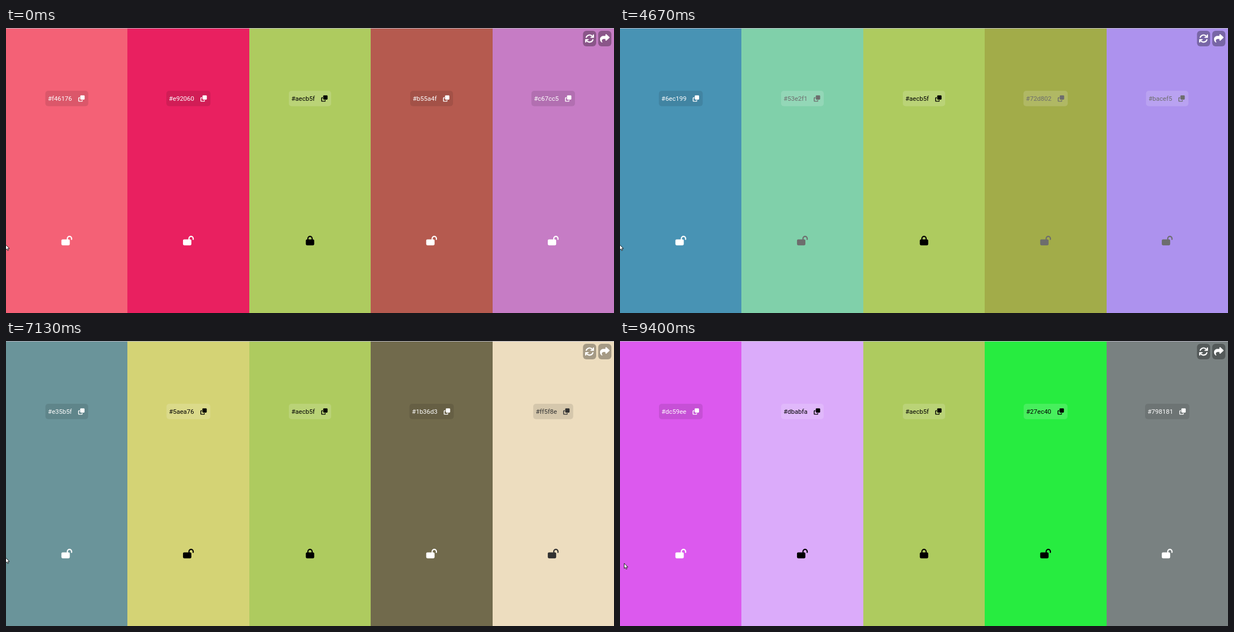
An HTML page with a canvas for the animation above (9940 ms loop, 1092 px wide and 513 px high).

```html
<!DOCTYPE html>
<html lang="en">
<head>
<meta charset="utf-8">
<title>Colour palettes</title>
<style>
  html, body { margin: 0; width: 100%; height: 100%; overflow: hidden; }
  canvas { display: block; }
</style>
</head>
<body>
<canvas id="stage" width="1092" height="513"></canvas>
<script>
const ctx = document.getElementById('stage').getContext('2d');
const LOOP = 9940, TICK = 1000 / 15, FADE = 100, COLUMN = 218.4;
const FONT = '11.5px Roboto, sans-serif';
const LOCKED = 2;

// Fade start in ms, then the five colours
const palettes = [
  [-FADE, 'f46176', 'e92060', 'aecb5f', 'b55a4f', 'c67cc5'],
  [3163, '9853bb', 'e5354c', 'aecb5f', 'c4261a', '83e3c1'],
  [3690, '1656d9', 'bcb94a', 'aecb5f', 'e272a9', '9b41e4'],
  [4633.5, '6ec199', '53e2f1', 'aecb5f', '72d802', 'bacef5'],
  [5450.5, 'a9a1a8', '5f8456', 'aecb5f', 'c1e27c', '78e121'],
  [6283, '4da2a8', 'f1cd75', 'aecb5f', '86762c', 'e9fbcb'],
  [7118, 'e35b5f', '5aea76', 'aecb5f', '1b36d3', 'ff5f8e'],
  [7933, 'dc59ee', 'dbabfa', 'aecb5f', '27ec40', '798181'],
].map(([start, ...colors]) => ({ start, colors }));

// Icons are drawn on a 512-unit grid
const copyIcon = new Path2D('M288 448H64V224h64V160H64c-35 0-64 29-64 64V448c0 35 29 64 64 64H288c35 0 64-29 64-64V384H288zM224 352H448c35 0 64-29 64-64V64c0-35-29-64-64-64H224c-35 0-64 29-64 64V288c0 35 29 64 64 64z');
const lockIcon = new Path2D('M144 144v48H304V144a80 80 0 0 0-160 0zM80 192V144a144 144 0 0 1 288 0v48h16a64 64 0 0 1 64 64V448a64 64 0 0 1-64 64H64a64 64 0 0 1-64-64V256a64 64 0 0 1 64-64z');
const openIcon = new Path2D('M352 144a80 80 0 0 1 160 0v48a32 32 0 0 0 64 0V144a144 144 0 0 0-288 0v48H64a64 64 0 0 0-64 64V448a64 64 0 0 0 64 64H384a64 64 0 0 0 64-64V256a64 64 0 0 0-64-64H352z');
const shareIcon = new Path2D('M307 35c-12 5-19 16-19 29v64H176C79 128 0 207 0 304c0 113 82 164 100 174 14 7 28-4 28-18 0-7-4-14-10-19-9-9-22-27-22-57 0-53 43-96 96-96h96v64c0 13 7 24 19 29s25 3 34-5l160-144c14-13 14-35 0-48l-160-144c-9-8-23-10-34-5z');
const turnArrow = new Path2D('M75 192A192 192 0 0 1 392 120L464 192M464 64V192H336');
const pointer = new Path2D('M.5 .5V9.3L2.6 7.5 4.1 10.8 5.6 10.1 4.2 7H6.9z');

const rgb = hex => [0, 2, 4].map(i => parseInt(hex.slice(i, i + 2), 16));
const mix = (a, b, f) => `rgb(${a.map((v, i) => Math.round(v + (b[i] - v) * f))})`;

function ink(color) {
  const [r, g, b] = color.map(v => {
    v /= 255;
    return v <= .03928 ? v / 12.92 : ((v + .055) / 1.055) ** 2.4;
  });
  return .2126 * r + .7152 * g + .0722 * b > .5 ? [0, 0, 0] : [255, 255, 255];
}

// CSS "ease": cubic-bezier(.25, .1, .25, 1)
function ease(x) {
  if (x <= 0) return 0;
  if (x >= 1) return 1;
  const curve = (a, b, s) => 3 * a * s * (1 - s) ** 2 + 3 * b * s * s * (1 - s) + s ** 3;
  let lo = 0, hi = 1;
  for (let i = 0; i < 20; i++) {
    const mid = (lo + hi) / 2;
    if (curve(.25, .25, mid) < x) lo = mid; else hi = mid;
  }
  return curve(.1, 1, lo);
}

function box(x, y, w, h, r, fill) {
  ctx.fillStyle = fill;
  ctx.beginPath();
  ctx.roundRect(x, y, w, h, r);
  ctx.fill();
}

function place(x, y, scale, draw) {
  ctx.save();
  ctx.translate(x, y);
  ctx.scale(scale, scale);
  draw();
  ctx.restore();
}

function icon(path, x, y, scale, fill) {
  ctx.fillStyle = fill;
  place(x, y, scale, () => ctx.fill(path));
}

function drawColumn(i, from, to, f) {
  const left = Math.round(i * COLUMN), right = Math.round((i + 1) * COLUMN);
  const middle = (i + .5) * COLUMN;
  const a = rgb(from), b = rgb(to), inkTo = ink(b);
  const color = mix(ink(a), inkTo, f);

  ctx.fillStyle = mix(a, b, f);
  ctx.fillRect(left, 0, right - left, 513);

  const label = '#' + to;
  const textWidth = ctx.measureText(label).width;
  const width = textWidth + 33.7, x = middle - width / 2;
  box(x, 113, width, 27.7, 5, inkTo[0] ? 'rgba(0,0,0,.1)' : 'rgba(255,255,255,.15)');
  ctx.fillStyle = color;
  ctx.fillText(label, x + 4.5, 131);
  icon(copyIcon, x + textWidth + 15.8, 121.2, .0223, color);

  const locked = i === LOCKED;
  icon(locked ? lockIcon : openIcon, middle - (locked ? 7.5 : 9.7), 374, .0336, color);
}

function drawButtons() {
  box(1036.3, 5, 23.7, 28, 6, 'rgba(0,0,0,.3)');
  box(1063.6, 5, 23.7, 28, 6, 'rgba(0,0,0,.3)');
  ctx.strokeStyle = '#fff';
  ctx.lineWidth = 64;
  ctx.lineCap = ctx.lineJoin = 'round';
  for (const angle of [0, Math.PI]) {
    place(1048.1, 18.9, .0332, () => {
      ctx.rotate(angle);
      ctx.translate(-256, -256);
      ctx.stroke(turnArrow);
    });
  }
  icon(shareIcon, 1066.9, 10, .0336, '#fff');
}

function drawPointer(time) {
  const f = Math.min(1, Math.max(0, (time - 9000) / 400));
  place(-1 + 8 * f, 390 + 10 * f, 1, () => {
    ctx.fillStyle = '#fff';
    ctx.strokeStyle = '#111';
    ctx.lineWidth = .9;
    ctx.lineJoin = 'miter';
    ctx.fill(pointer);
    ctx.stroke(pointer);
  });
}

function draw(ms) {
  // The picture advances fifteen times a second
  const time = Math.floor((ms % LOOP + 5) / TICK) * TICK;
  const index = palettes.findLastIndex(p => p.start <= time + .5);
  const now = palettes[index], before = palettes[Math.max(0, index - 1)];
  const f = ease((time - now.start) / FADE);
  ctx.font = FONT;
  now.colors.forEach((color, i) => drawColumn(i, before.colors[i], color, f));
  ctx.fillStyle = '#b8b8c4';
  ctx.fillRect(0, 0, 1092, 1);
  drawButtons();
  drawPointer(time);
}

const begin = performance.now();
function loop() {
  draw(performance.now() - begin);
  requestAnimationFrame(loop);
}
loop();
</script>
</body>
</html>
```
